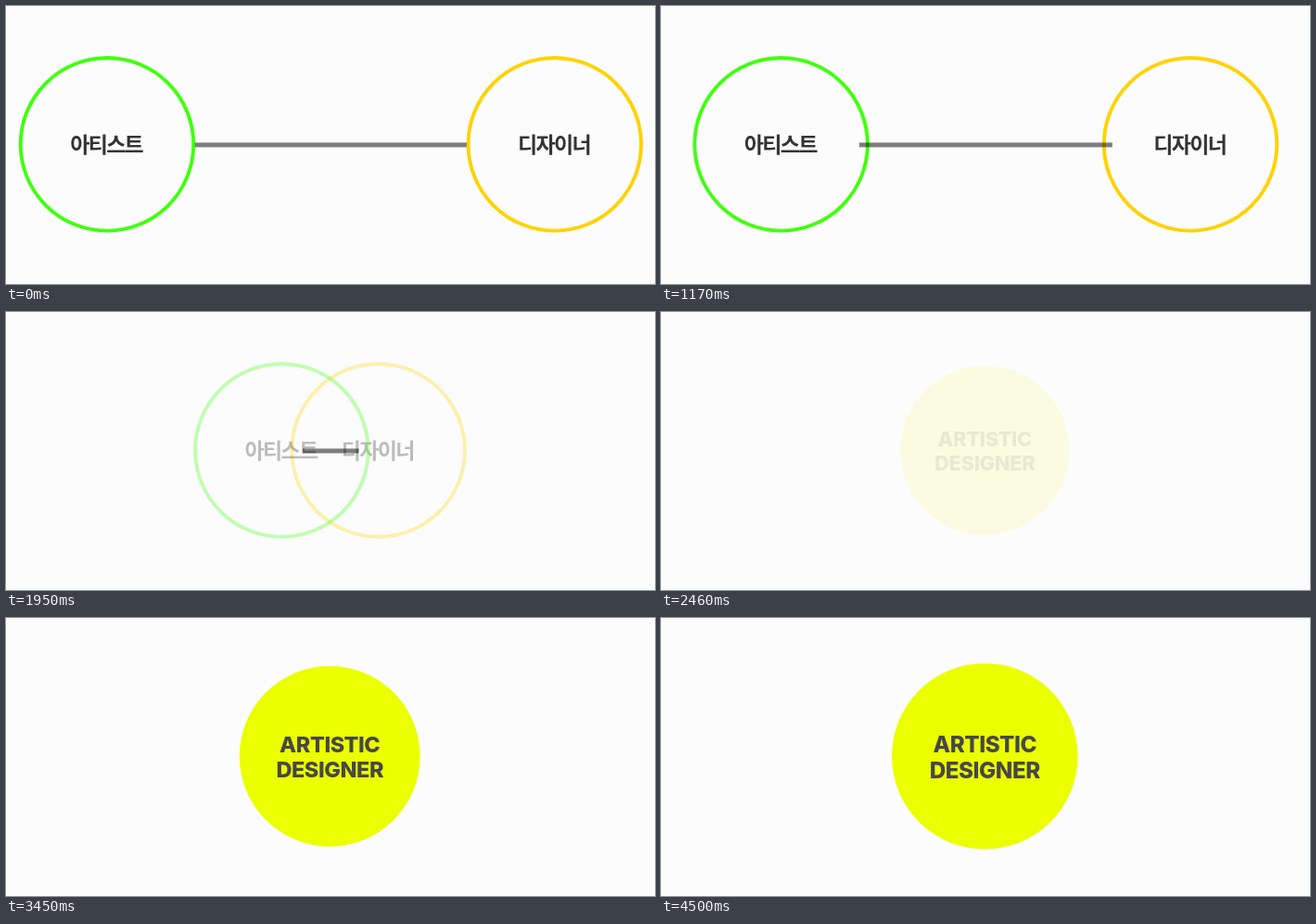
An HTML page with a canvas for the animation above (5.43 s loop, 700 px wide and 300 px high).

```html
<!DOCTYPE html>
<html lang="ko">
<head>
<meta charset="utf-8">
<title>Artistic Designer</title>
<style>
  html, body { margin: 0; width: 100%; height: 100%; overflow: hidden; background: #fcfcfc; }
  canvas { display: block; width: 700px; height: 300px; }
</style>
</head>
<body>
<canvas id="stage" width="700" height="300"></canvas>
<script>
const ctx = document.getElementById('stage').getContext('2d');
const LOOP = 5430, STEP = 30;
const MID = { x: 349.25, y: 149.3 };
const KOREAN = '700 23px "Noto Sans CJK KR", "Noto Sans KR", "Noto Sans CJK", "Noto Sans CJK JP", sans-serif';
const LATIN = '800 22px Inter, sans-serif';

const span = (t, from, to) => Math.min(1, Math.max(0, (t - from) / (to - from)));
const smooth = u => u * u * (3 - 2 * u);
const mix = (a, b, u) => a + (b - a) * u;

// cubic-bezier(.4, 0, .6, 1), solved by bisection
function steep(u) {
  let lo = 0, hi = 1;
  for (let i = 0; i < 24; i++) {
    const s = (lo + hi) / 2, r = 1 - s;
    if (1.2 * s * r * r + 1.8 * s * s * r + s * s * s < u) lo = s; else hi = s;
  }
  return smooth(lo);
}

function label(text, x, y, font, color, spacing) {
  ctx.font = font;
  ctx.fillStyle = color;
  ctx.letterSpacing = spacing + 'px';
  ctx.textAlign = 'center';
  ctx.textBaseline = 'alphabetic';
  ctx.fillText(text, x + spacing / 2, y);
}

function ring(x, color, text) {
  ctx.strokeStyle = color;
  ctx.lineWidth = 3.9;
  ctx.beginPath();
  ctx.arc(x, MID.y, 93.3, 0, Math.PI * 2);
  ctx.stroke();
  label(text, x, 158, KOREAN, '#333', -1.7);
}

function drawRings(t) {
  const move = smooth(span(t, 900, 2400));
  ctx.globalAlpha = 1 - smooth(span(t, 1200, 2400));
  ring(mix(591.8, MID.x, move), '#ffd200', '디자이너');
  ring(mix(109, MID.x, move), '#40ff0d', '아티스트');
  ctx.globalAlpha = 1;
}

function drawLine(t) {
  const half = 146.5 * (1 - steep(span(t, 900, 2420)));
  if (half < 0.1) return;
  ctx.globalCompositeOperation = 'multiply';
  ctx.fillStyle = '#808080';
  ctx.fillRect(350.3 - half, 147.4, half * 2, 5);
  ctx.globalCompositeOperation = 'source-over';
}

// Five alternating half-beats, ending on the enlarged size
function pulse(t) {
  const beat = span(t, 3300, 4500) * 5;
  const saw = beat % 2;
  return 1 + 0.1 * smooth(saw > 1 ? 2 - saw : saw);
}

function drawDisc(t) {
  const alpha = smooth(span(t, 2400, 2700));
  if (!alpha) return;
  const size = pulse(t);
  ctx.save();
  ctx.globalAlpha = alpha;
  ctx.translate(MID.x, 149.2);
  ctx.scale(size, size);
  ctx.fillStyle = '#ebff00';
  ctx.beginPath();
  ctx.arc(0, 0, 91.2, 0, Math.PI * 2);
  ctx.fill();
  label('ARTISTIC', 0.2, -4.2, LATIN, '#474747', -0.4);
  label('DESIGNER', 0.2, 21.8, LATIN, '#474747', -0.4);
  ctx.restore();
}

function draw(now) {
  const t = Math.floor((now % LOOP) / STEP) * STEP;
  ctx.fillStyle = '#fcfcfc';
  ctx.fillRect(0, 0, 700, 300);
  drawRings(t);
  drawLine(t);
  drawDisc(t);
  requestAnimationFrame(() => draw(performance.now() - start));
}

const start = performance.now();
draw(0);
</script>
</body>
</html>
```
